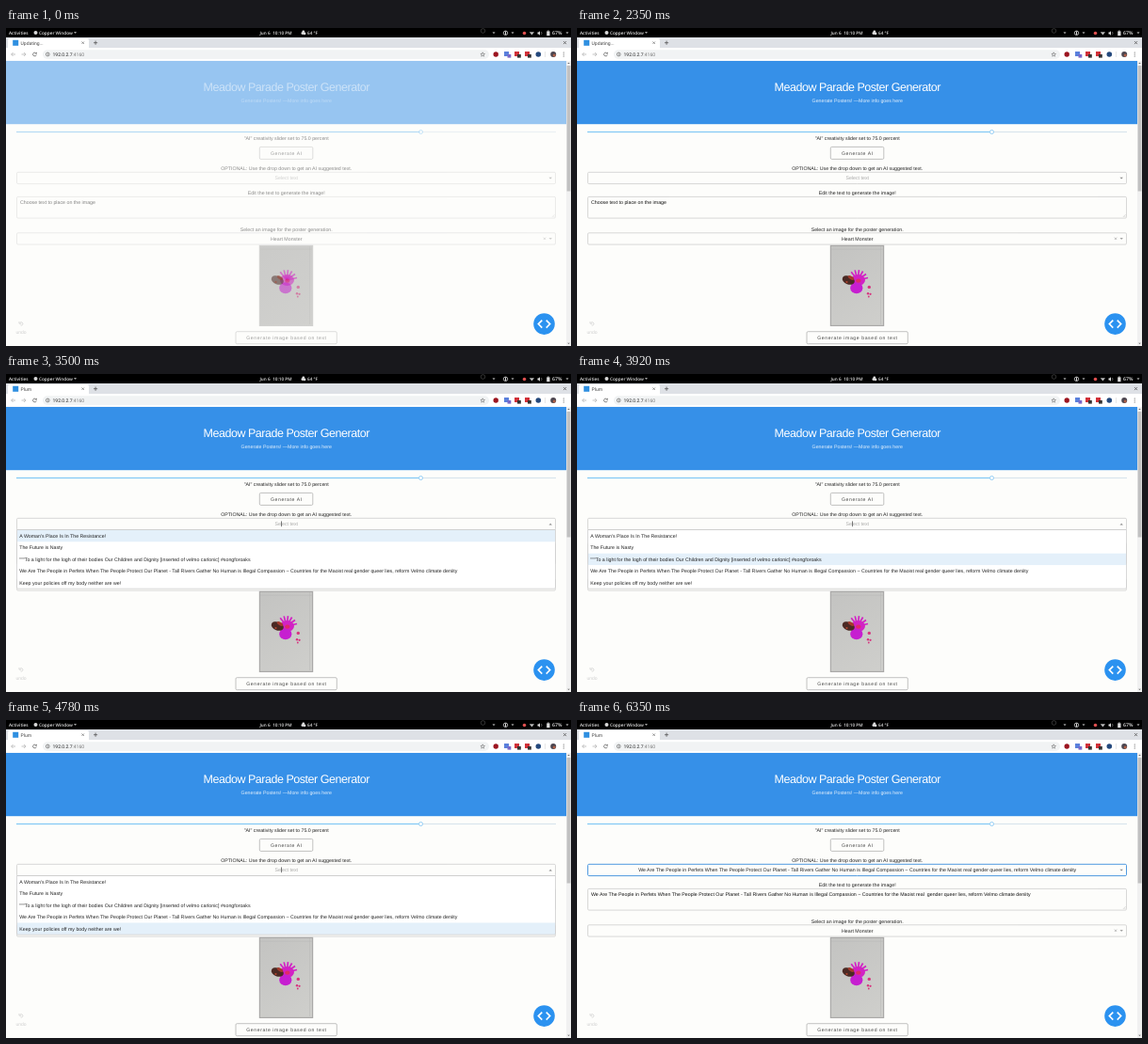
Animation of 600x338 px, one loop 8 s. Source, as an HTML page with a canvas:

```html
<!DOCTYPE html>
<html lang="en">
<head>
<meta charset="utf-8">
<title>Poster Generator</title>
<style>
  html, body { margin: 0; width: 100%; height: 100%; overflow: hidden; background: #fdfdfb; }
  canvas { display: block; width: 600px; height: 338px; }
</style>
</head>
<body>
<canvas id="stage"></canvas>
<script>
const W = 600, H = 338, LOOP = 8000;
const canvas = document.getElementById('stage');
const ratio = window.devicePixelRatio || 1;
canvas.width = Math.round(W * ratio);
canvas.height = Math.round(H * ratio);
const c = canvas.getContext('2d');

const SANS = '"Liberation Sans", Arial, sans-serif';
const SHELL = '"Open Sans", "Noto Sans", sans-serif';
const CHROME = 'Roboto, "Noto Sans", sans-serif';
const BODY = 5.27;
const PAGE = '#fdfdfb', BLUE = '#3690e8', LINE = '#c8c8c8';

const CHOICE = 'We Are The People in Perfets When The People Protect Our Planet - Tall Rivers Gather No Human is Illegal Compassion ~ Countries for the Maoist real gender queer lies, reform Velmo climate deniity';
const OPTIONS = [
  "A Woman's Place Is In The Resistance!",
  'The Future is Nasty',
  '"""To a light for the logh of their bodies Our Children and Dignity [inserted of velmo carlonic] #songforoaks',
  CHOICE,
  'Keep your policies off my body neither are we!'
];

// Moments of the story, in ms
const READY = 2350, TITLE = 2500, OPEN = 2920, PICK = 6210, FILL = 6350;
const HOVER = [[OPEN, 0], [3780, 1], [3920, 2], [4070, 3], [4350, 4], [5500, 3]];

function text(s, x, y, o = {}) {
  c.font = `${o.weight || 400} ${o.size || BODY}px ${o.font || SANS}`;
  c.letterSpacing = (o.gap || 0) + 'px';
  c.textAlign = o.align || 'left';
  c.fillStyle = o.color || '#222';
  c.fillText(s, x, y);
}

function mid(s, y, o = {}) {
  text(s, 297.7, y, { align: 'center', ...o });
}

function rect(x, y, w, h, color) {
  c.fillStyle = color;
  c.fillRect(x, y, w, h);
}

function box(x, y, w, h, r, fill, stroke, lw = 0.7) {
  c.beginPath();
  c.roundRect(x, y, w, h, r);
  if (fill) { c.fillStyle = fill; c.fill(); }
  if (stroke) { c.strokeStyle = stroke; c.lineWidth = lw; c.stroke(); }
}

function oval(x, y, rx, ry, color, turn = 0) {
  c.beginPath();
  c.ellipse(x, y, rx, ry, turn, 0, Math.PI * 2);
  c.fillStyle = color;
  c.fill();
}

const dot = (x, y, r, color) => oval(x, y, r, r, color);

function ring(x, y, r, color, lw, from = 0, to = Math.PI * 2) {
  c.beginPath();
  c.arc(x, y, r, from, to);
  c.strokeStyle = color;
  c.lineWidth = lw;
  c.stroke();
}

function path(points, color, lw) {
  c.beginPath();
  points.forEach(([x, y], i) => i ? c.lineTo(x, y) : c.moveTo(x, y));
  if (lw) { c.strokeStyle = color; c.lineWidth = lw; c.stroke(); }
  else { c.fillStyle = color; c.fill(); }
}

// Small triangle; dir 1 points down, -1 up
function arrow(x, y, r, dir, color) {
  path([[x - r, y - dir * r / 2], [x + r, y - dir * r / 2], [x, y + dir * r / 2]], color);
}

function cross(x, y, r, color, lw) {
  path([[x - r, y - r], [x + r, y + r]], color, lw);
  path([[x - r, y + r], [x + r, y - r]], color, lw);
}

function topBar() {
  rect(0, 0, W, 10, '#000');
  const o = { font: SHELL, weight: 600, size: 4.7, color: '#e4e4e4' };
  text('Activities', 3, 6.7, o);
  dot(31.5, 5, 2, '#d8d8d8');
  text('Copper Window', 35, 6.7, o);
  arrow(73.5, 5, 1.5, 1, '#ddd');
  text('Jun 6  10:10 PM', 286.5, 6.7, { ...o, align: 'center' });
  dot(315, 5.6, 1.5, '#ddd');
  dot(317, 5.9, 1.4, '#ddd');
  dot(315.8, 4, 1.4, '#ddd');
  text('64 °F', 320, 6.7, o);

  ring(506.5, 3, 2.3, '#555', 0.6);
  arrow(518, 5.3, 1.5, 1, '#ddd');
  ring(530.5, 5.3, 2.2, '#ddd', 0.8);
  rect(530, 3.5, 1, 3.6, '#ddd');
  arrow(538, 5.3, 1.5, 1, '#ddd');
  dot(550.5, 5.5, 1.8, '#e05050');
  path([[555.8, 4.2], [561, 4.2], [558.4, 7.6]], '#bbb');
  path([[564.5, 4.6], [565.6, 4.6], [567, 3.2], [567, 7.8], [565.6, 6.4], [564.5, 6.4]], '#ddd');
  ring(567.3, 5.5, 1.7, '#bbb', 0.5, -1, 1);
  rect(574.2, 3.4, 3.3, 4.8, '#ddd');
  rect(575.1, 2.6, 1.5, 0.8, '#ddd');
  text('67%', 580, 6.9, { ...o, size: 5.2 });
  arrow(596, 5.3, 1.5, 1, '#ddd');
}

function browser(title) {
  rect(0, 10, W, 11.5, '#dee1e6');
  box(2, 11, 86, 14, 2.2, '#fff');
  rect(0, 21.2, W, 13.6, '#fff');
  rect(7.2, 12.8, 6, 6, '#2f8fe0');
  text(title, 15.6, 17.6, { font: CHROME, size: 5, color: '#444' });
  cross(81.7, 15.7, 1.2, '#555', 0.6);
  path([[93, 15.7], [97.2, 15.7]], '#444', 0.7);
  path([[95.1, 13.6], [95.1, 17.8]], '#444', 0.7);
  cross(593.5, 15.6, 1.5, '#444', 0.7);

  path([[10, 28], [5.7, 28]], '#aaa', 0.7);
  path([[7.6, 26], [5.6, 28], [7.6, 30]], '#aaa', 0.7);
  path([[16.5, 28], [20.8, 28]], '#aaa', 0.7);
  path([[18.9, 26], [20.9, 28], [18.9, 30]], '#aaa', 0.7);
  ring(30.5, 28, 1.9, '#555', 0.7, 0.3, 5.4);
  path([[30.8, 27.5], [32.7, 25.6], [32.7, 27.5]], '#555');

  box(39, 23.3, 474, 9.6, 4.8, '#f1f3f4');
  ring(44.3, 28, 1.9, '#555', 0.6);
  rect(44, 27.5, 0.6, 1.6, '#555');
  rect(44, 26.6, 0.6, 0.5, '#555');
  const url = { font: CHROME, size: 5.05 };
  text('192.0.2.7', 49.5, 29.8, { ...url, color: '#222' });
  const used = c.measureText('192.0.2.7').width;
  text(':4160', 49.5 + used, 29.8, { ...url, color: '#777' });

  const star = [];
  for (let i = 0; i < 11; i++) {
    const a = -Math.PI / 2 + i * Math.PI / 5, r = i % 2 ? 1.05 : 2.4;
    star.push([506.2 + r * Math.cos(a), 28.2 + r * Math.sin(a)]);
  }
  path(star, '#555', 0.5);

  dot(520.2, 28, 2.7, '#9c1420');
  rect(529, 25, 5, 5, '#5a80dc');
  rect(540, 25, 5, 5, '#d03038');
  rect(551, 25, 5, 5, '#d03038');
  for (const [x, color] of [[532.5, '#7968c8'], [543, '#333'], [554, '#333']]) rect(x, 28, 3.8, 3.6, color);
  dot(565.3, 28, 2.8, '#24487c');
  rect(572.5, 25, 0.5, 6, '#ccc');
  dot(581.2, 28, 3, '#4c4650');
  dot(582.2, 29, 1.5, '#b06048');
  for (const y of [26, 28, 30]) dot(592.2, y, 0.55, '#555');
}

function poster() {
  const g = c.createLinearGradient(269, 231, 326, 317);
  g.addColorStop(0, '#c3c3c1');
  g.addColorStop(1, '#cfcfcc');
  rect(268.8, 230.8, 57.4, 86.2, '#aaa9a8');
  rect(270, 232, 55, 83.8, g);
  path([[270, 235.2], [325, 235.2]], '#b7b7b5', 0.5);
  path([[322.5, 232], [322.5, 315]], '#b9b9b7', 0.5);

  const pink = '#d222c4';
  for (let i = 0; i < 6; i++) {
    const a = -2.2 + i * 0.38;
    path([[298, 268], [298 + 11.5 * Math.cos(a), 269 + 12 * Math.sin(a)]], pink, 1.7);
  }
  oval(298.5, 268, 7.5, 6, pink);
  oval(296.8, 276.3, 6.6, 6, '#c61fd0');
  oval(288.3, 268, 6.8, 4.5, '#4b2a24', 0.35);
  oval(291, 265.5, 3.5, 1.7, '#a53a2c', 0.5);
  dot(286.5, 270, 1.1, '#b5452e');
  oval(298.8, 268.6, 2.6, 2.2, '#e02a68');
  for (const [x, y, r] of [[310.3, 275.4, 1.7], [309, 282.2, 1.2], [311.6, 282.8, 1.1], [309.8, 285.5, 0.9]]) {
    dot(x, y, r, '#d8327e');
  }
}

function button(s, x, y, w, base) {
  box(x, y, w, 13, 1.3, PAGE, '#a8a8a8');
  text(s, x + w / 2 + 0.3, base, { align: 'center', size: 5.1, gap: 0.6, color: '#444' });
}

function field(y, h, stroke = LINE, lw) {
  box(11.5, y, 572, h, 1.3, PAGE, stroke, lw);
}

function menu(hover) {
  rect(11.5, 165.8, 572, 62.4, '#fff');
  OPTIONS.forEach((s, i) => {
    const y = 165.9 + i * 12.4;
    if (i === hover) rect(11.8, y, 571.4, 12.4, '#e4f0fa');
    text(s, 14.2, y + 8, { color: '#222' });
  });
  box(11.5, 165.5, 572, 62.7, [0, 0, 1.3, 1.3], null, LINE);
}

function page(t) {
  const open = t >= OPEN && t < PICK, picked = t >= PICK;

  rect(0, 34.8, 595, 67.4, BLUE);
  mid('Meadow Parade Poster Generator', 66.8, { size: 12.5, gap: -0.47, color: '#fff' });
  mid('Generate Posters! —More info goes here', 79.4, { color: '#e6f1fc' });

  rect(11, 109.9, 573, 1.2, '#d9e4ec');
  rect(11, 109.9, 429, 1.2, '#84c9f5');
  dot(440.5, 110.5, 2.2, '#fff');
  ring(440.5, 110.5, 2, '#7cc2f0', 0.8);
  mid('"AI" creativity slider set to 75.0 percent', 118.7);
  button('Generate AI', 269.3, 126.4, 56.5, 134.8);

  mid('OPTIONAL: Use the drop down to get an AI suggested text.', 151);
  field(153.3, 12.3, picked ? '#3d8fdd' : LINE, picked ? 0.9 : 0.7);
  if (picked) mid(CHOICE, 161.2);
  else mid('Select text', 161.2, { color: '#a9a9a9' });
  if (open) rect(292.2, 156.4, 0.6, 5.8, '#333');
  arrow(578.2, 159.6, 1.7, open ? -1 : 1, '#888');

  mid('Edit the text to generate the image!', 177);
  field(179.4, 22.7);
  text(t >= FILL ? CHOICE.replace('real gender', 'real  gender') : 'Choose text to place on the image', 15, 187.3, { color: '#111' });
  path([[579.8, 201], [582.6, 198.2]], '#aaa', 0.4);
  path([[581.4, 201], [582.6, 199.8]], '#aaa', 0.4);

  mid('Select an image for the poster generation.', 215.5);
  field(217.8, 12.3);
  mid('Heart Monster', 225.8);
  cross(572, 223.8, 1.2, '#999', 0.6);
  arrow(578.2, 224, 1.7, 1, '#888');

  poster();
  button('Generate image based on text', 244, 322.7, 107.3, 331);

  if (open) menu(HOVER.filter(h => t >= h[0]).pop()[1]);
}

function overlay() {
  ring(16.2, 314.4, 1.7, '#c6c6c6', 0.6, -2.4, 2);
  path([[14, 312], [14, 314.2], [16.2, 314.2]], '#c6c6c6', 0.6);
  text('undo', 16, 324.6, { align: 'center', size: 5, color: '#d0d0d0' });

  dot(571.5, 314.6, 11.3, '#2b92f0');
  for (const d of [-1, 1]) {
    path([[571.5 + d * 2.2, 310.6], [571.5 + d * 6.2, 314.6], [571.5 + d * 2.2, 318.6]], '#fff', 1.6);
  }

  rect(595, 34.8, 5, 303.2, '#f1f1f1');
  rect(595.6, 40, 3.9, 133.5, '#c1c1c1');
  arrow(597.5, 37.3, 1.3, -1, '#666');
  arrow(597.5, 335.4, 1.3, 1, '#666');
}

function draw(t) {
  c.setTransform(ratio, 0, 0, ratio, 0, 0);
  c.textRendering = 'geometricPrecision';
  c.globalAlpha = 1;
  rect(0, 0, W, H, PAGE);
  c.globalAlpha = t < READY ? 0.51 : 1;
  page(t);
  c.globalAlpha = 1;
  overlay();
  browser(t < TITLE ? 'Updating...' : 'Plum');
  topBar();
}

const start = performance.now();
function tick() {
  draw((performance.now() - start) % LOOP);
  requestAnimationFrame(tick);
}
tick();
</script>
</body>
</html>
```
